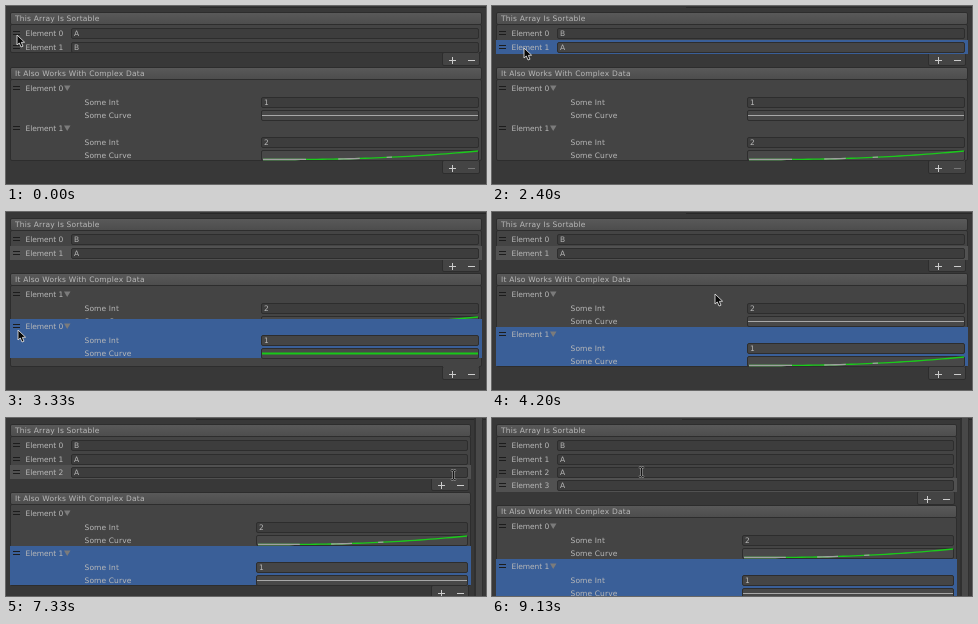
Animation, 480 px wide and 178 px high, one loop 9190 ms. Source, as an HTML page with a canvas:

```html
<!DOCTYPE html>
<html lang="en">
<head>
<meta charset="utf-8">
<title>Sortable arrays</title>
<style>
html, body { margin: 0; width: 480px; height: 178px; overflow: hidden; background: #383838; }
canvas { display: block; }
</style>
</head>
<body>
<canvas id="stage" width="480" height="178"></canvas>
<script>
const ctx = document.getElementById('stage').getContext('2d');
const LOOP = 9190, STEP = 200 / 3, ROW = 13.35, BLOCK = 3 * ROW;
const BLUE = '#3a5f98', INK = '#b8b8b8', EDGE = '#2d2d2d';

// Moments of interaction
const PRESS_A = 670, DROP_A = 1270, PRESS_B = 2800, DROP_B = 3670, ADD_1 = 6800, ADD_2 = 7870;

// Pointer path: time, x, y
const path = [
  [0, 11, 29], [800, 11, 29], [1200, 11, 37], [1270, 11, 41], [1470, 11, 41],
  [2000, 22, 44], [2400, 32, 42], [2530, 11, 86], [2790, 11, 86], [3000, 12, 100],
  [3470, 12, 126], [3670, 12, 126], [4200, 223, 82], [4400, 223, 82], [5330, 438, 59],
  [5600, 446, 57], [6270, 446, 57], [6530, 446, 54], [6800, 446, 54], [7070, 448, 57],
  [7330, 448, 57], [7670, 435, 68], [8470, 435, 68], [9130, 150, 54], [LOOP, 150, 54]
];

function pointerAt(t) {
  const i = Math.max(1, path.findIndex(p => p[0] >= t));
  const [t0, x0, y0] = path[i - 1], [t1, x1, y1] = path[i];
  const k = (t - t0) / (t1 - t0);
  return [Math.round(x0 + (x1 - x0) * k), Math.round(y0 + (y1 - y0) * k)];
}

function rect(x, y, w, h, color) {
  ctx.fillStyle = color;
  ctx.fillRect(x, y, w, h);
}

function panel(x, y, w, h, fill) {
  ctx.beginPath();
  ctx.roundRect(x + .5, y + .5, w - 1, h - 1, 1.5);
  ctx.fillStyle = fill;
  ctx.fill();
  ctx.lineWidth = 1;
  ctx.strokeStyle = EDGE;
  ctx.stroke();
}

function text(s, x, y, spacing = .12) {
  ctx.font = '7.5px "DejaVu Sans", sans-serif';
  ctx.letterSpacing = spacing + 'px';
  ctx.fillStyle = INK;
  ctx.fillText(s, x, Math.round(y) + 3);
}

function line(points, color, width = 1) {
  ctx.beginPath();
  points.forEach(p => ctx.lineTo(...p));
  ctx.strokeStyle = color;
  ctx.lineWidth = width;
  ctx.stroke();
}

function handle(y) {
  rect(7, y - 2, 7, 1, '#1c1c1c');
  rect(7, y + 1, 7, 1, '#1c1c1c');
}

function field(x, y, right, fill, value) {
  y = Math.round(y);
  panel(x, y - 5, right - x, 11, fill);
  if (value) text(value, x + 3, y);
}

function frame(title, y, bodyHeight, right, canRemove) {
  const bottom = y + 13 + bodyHeight;
  const g = ctx.createLinearGradient(0, y, 0, y + 13);
  g.addColorStop(0, '#5a5a5a');
  g.addColorStop(1, '#4c4c4c');
  panel(4, y + 12, right - 4, bodyHeight + 1, '#444');
  panel(4, y, right - 4, 13, g);
  text(title, 9, y + 6, .2);
  panel(right - 40, Math.round(bottom) - 1, 38, 14, '#444');
  rect(right - 39, Math.round(bottom) - 2, 36, 2, '#444');
  const px = right - 30, mx = right - 11, cy = Math.round(bottom + 7);
  rect(px - 3, cy, 7, 1, '#ccc');
  rect(px, cy - 3, 1, 7, '#ccc');
  rect(mx - 3, cy, 7, 1, canRemove ? '#ccc' : '#777');
}

function simpleRow(index, value, y, right, back) {
  if (back) rect(4, Math.round(y - 7), right - 4, 14, back);
  handle(Math.round(y));
  text('Element ' + index, 19.5, y, -.05);
  field(65, y, right - 3, back === BLUE ? '#454545' : '#3d3d3d', value);
}

function curve(x, y, right, rising, bright) {
  if (!rising) {
    line([[x + 1, y + .5], [right - 1, y + .5]], bright ? '#18c818' : '#a8a8a8', bright ? 2 : 1);
    return;
  }
  const w = right - x - 3, points = [];
  for (let i = 0; i <= 40; i++)
    points.push([x + 2 + w * i / 40, y + 4.5 - 8.5 * Math.pow(Math.max(0, i / 40 - .1) / .9, 2.2)]);
  line(points, '#1acb1a', 1.3);
  for (const [from, to] of [[0, 9], [14, 19], [23, 25]])
    line(points.slice(from, to), '#a0a0a0', 1.3);
}

function complexRow(index, value, top, right, rising, back, bright) {
  const y = top + 7, labelY = Math.floor(y), x = right > 470 ? 255 : 250;
  if (back) rect(4, Math.floor(top), right - 4, 39, back);
  handle(labelY);
  text('Element ' + index, 19.5, labelY, -.05);
  ctx.beginPath();
  ctx.moveTo(58, labelY - 2.5);
  ctx.lineTo(64.5, labelY - 2.5);
  ctx.lineTo(61.2, labelY + 3);
  ctx.fillStyle = '#7b7b7b';
  ctx.fill();
  text('Some Int', 78.5, y + ROW);
  field(x, y + ROW, right - 3, back ? '#454545' : '#3d3d3d', value);
  text('Some Curve', 78.5, y + 2 * ROW);
  const cy = Math.round(y + 2 * ROW);
  field(x, cy, right - 3, '#484848');
  curve(x, cy, right - 3, rising, bright);
}

function arrow(x, y) {
  const shape = [[0, 0], [0, 10], [2.3, 8], [4, 12], [6, 11.2], [4.4, 7.4], [7.6, 7.2]];
  ctx.beginPath();
  shape.forEach(([a, b]) => ctx.lineTo(x + a, y + b));
  ctx.closePath();
  ctx.fillStyle = '#080808';
  ctx.fill();
  ctx.strokeStyle = '#ddd';
  ctx.lineWidth = .9;
  ctx.stroke();
}

function beam(x, y) {
  for (const [color, width] of [['#b0b0b0', 2], ['#141414', 1]]) {
    line([[x - .5, y - 4], [x - .5, y + 4]], color, width);
    line([[x - 3, y - 5], [x - .5, y - 4], [x + 2, y - 5]], color, width);
    line([[x - 3, y + 5], [x - .5, y + 4], [x + 2, y + 5]], color, width);
  }
}

function drawSimple(t, pointerY, added, right) {
  frame('This Array Is Sortable', 6, 28 + added * ROW, right, true);
  const y0 = 27.3;
  if (t < DROP_A) {
    const held = t >= PRESS_A;
    const shift = held ? Math.min(ROW, Math.max(0, pointerY - 29)) : 0;
    simpleRow(1, 'B', y0 + (shift > ROW / 2 ? 0 : ROW), right);
    simpleRow(0, 'A', y0 + shift, right, held && BLUE);
    return;
  }
  for (let i = 0; i < 2 + added; i++) {
    const back = i === 1 + added && (t < PRESS_B ? BLUE : '#515151');
    simpleRow(i, i ? 'A' : 'B', y0 + i * ROW, right, back);
  }
}

function drawComplex(t, pointerY, added, right) {
  const y = Math.floor(61 + added * ROW), top = y + 14.5, next = top + BLOCK;
  frame('It Also Works With Complex Data', y, 81, right, t >= PRESS_B);
  if (t < DROP_B) {
    const held = t >= PRESS_B;
    const shift = held ? Math.min(BLOCK, Math.max(0, pointerY - 86)) : 0;
    complexRow(1, '2', shift > BLOCK / 2 ? top : next, right, true);
    complexRow(0, '1', top + shift, right, false, held && BLUE, held);
    return;
  }
  // Curve previews refresh only once the layout changes
  complexRow(0, '2', top, right, added > 0);
  complexRow(1, '1', next, right, !added, BLUE);
}

function draw(now) {
  const t = Math.floor((now % LOOP + 5) / STEP) * STEP + 1;
  const [x, y] = pointerAt(t);
  const added = (t >= ADD_1) + (t >= ADD_2);
  const right = added ? 465 : 476;
  rect(0, 0, 480, 178, '#383838');
  rect(added ? 190 : 194, 1, 290, 1, '#292929');
  if (added) {
    rect(468, 0, 9, 178, '#303030');
    rect(470, 0, 6, 178, '#484848');
  }
  drawSimple(t, y, added, right);
  drawComplex(t, y, added, right);
  const overField = x > 65 && y > 20 && y < 47 + added * ROW;
  (overField ? beam : arrow)(x, y);
  requestAnimationFrame(tick);
}

const start = performance.now();
function tick() { draw(performance.now() - start); }
tick();
</script>
</body>
</html>
```
